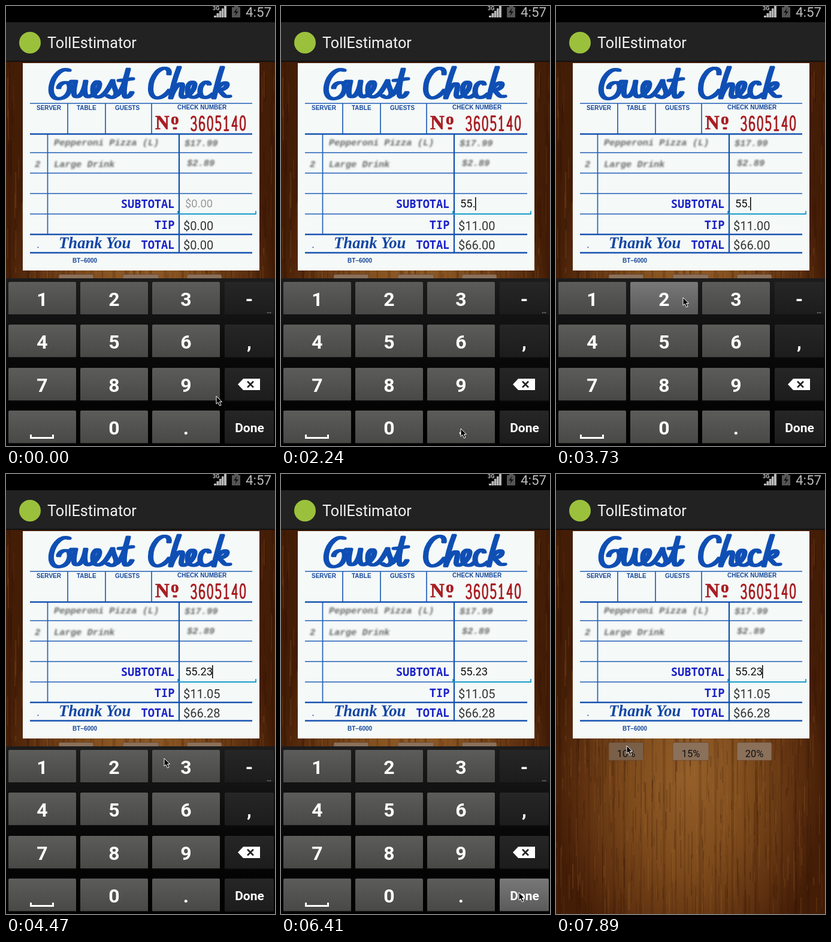
Recreate the animation shown at these times as an HTML page. Size 449 px wide and 732 px high, loop 8000 ms.

```html
<!DOCTYPE html>
<html lang="en">
<head>
<meta charset="utf-8">
<title>Tip screen</title>
<style>
html, body { margin: 0; width: 100%; height: 100%; overflow: hidden; background: #000; }
svg { display: block; font-family: Roboto, sans-serif; }
.label { font: bold 10px "Liberation Sans", Arial, sans-serif; fill: #16489c; }
.row { font: bold 18.7px "Noto Sans Mono", monospace; fill: #1a22c8; text-anchor: end; }
.faded { font: italic bold 15.4px "Liberation Mono", monospace; fill: #666; filter: blur(1.4px); }
.value { font-size: 20px; fill: #333; }
.key { font-size: 32px; font-weight: bold; fill: #fff; text-anchor: middle; }
.percent { font-size: 16.5px; fill: #111; text-anchor: middle; }
.ink { fill: none; stroke-linecap: round; stroke-linejoin: round; }
</style>
</head>
<body>
<svg id="stage" width="449" height="732" viewBox="0 0 449 732">
  <defs>
    <radialGradient id="wood" gradientUnits="userSpaceOnUse" cx="0" cy="0" r="1" gradientTransform="translate(222 500) scale(260 400)">
      <stop offset="0" stop-color="#96602a"/><stop offset=".4" stop-color="#7d4a1b"/>
      <stop offset=".68" stop-color="#5f3110"/><stop offset=".88" stop-color="#441d06"/>
    </radialGradient>
    <linearGradient id="grey" x2="0" y2="1"><stop stop-color="#5c5c5b"/><stop offset="1" stop-color="#484847"/></linearGradient>
    <linearGradient id="dark" x2="0" y2="1"><stop stop-color="#262626"/><stop offset="1" stop-color="#1c1c1c"/></linearGradient>
    <linearGradient id="lit" x2="0" y2="1"><stop stop-color="#787878"/><stop offset="1" stop-color="#5a5a5a"/></linearGradient>
    <linearGradient id="board" x2="0" y2="1"><stop stop-color="#1c1c1c"/><stop offset=".5" stop-color="#080808"/><stop offset="1"/></linearGradient>
  </defs>
  <rect y="93" width="449" height="639" fill="url(#wood)"/>
  <g id="grain"></g>

  <!-- status and title bars -->
  <rect width="449" height="27"/>
  <rect y="27" width="449" height="65" fill="#222"/>
  <rect y="91" width="449" height="2" fill="#111"/>
  <text x="345" y="7" font-size="9" font-weight="bold" fill="#c4c4c4">3G</text>
  <path d="M347 19V16H351V19ZM351.500 19V12H355.500V19ZM356 19V8H359.500V19ZM360 19V4H363.500V19ZM364 19V0H368V19Z" fill="#b8b8b8"/>
  <path d="M377 2H381V0H388V2H391V19H377Z" fill="#555"/>
  <path d="M386 3L380 11H384L382 17L388 9H384Z" fill="#111"/>
  <text x="400" y="18" font-size="22.400" fill="#bbb">4:57</text>
  <circle cx="40" cy="61" r="18" fill="#9bc13c"/>
  <text x="69" y="70" font-size="25.200" fill="#f3f3f3">TollEstimator</text>

  <!-- paper; the lettering is drawn with a broad pen made of shifted strokes -->
  <rect x="28" y="95" width="395" height="345" fill="#f5f9f8"/>
  <g class="ink" stroke="#0f4fb4" stroke-width="4.800">
    <path id="lettering" d="M105 107C94 102 80 114 76 132C73 148 80 156 91 154C103 152 109 140 105 129C98 124 89 130 88 136M105 129L110 125
      M116 125C113 138 111 151 118 151C126 151 131 138 133 125C130 140 131 152 138 151C148 148 156 138 156 130C155 122 145 126 145 140C145 154 156 154 164 146C170 140 176 128 178 124C178 134 188 144 182 150C178 154 172 152 169 149
      M182 150C194 146 200 120 204 105C200 120 195 140 198 150C201 154 207 150 210 144M189 124L211 121
      M272 113C274 102 262 100 252 110C238 126 238 152 252 153C261 153 269 146 273 140
      M289 102C282 120 277 140 275 153C280 138 289 126 294 130C297 136 287 152 297 152C305 150 315 140 315 130C313 123 303 127 303 140C303 154 315 155 323 147
      M339 130C337 122 324 128 324 142C324 156 337 154 346 146
      M361 102C355 120 350 140 347 153M350 140C358 130 367 124 369 130C369 138 358 140 354 140C362 142 362 154 373 150"/>
    <use href="#lettering" x="-2.200"/><use href="#lettering" x="2.200"/>
  </g>
  <path d="M40 162H411M40 244H411M40 278H411M40 312H411M40 346H288M103 162V212M166 162V212M243 162V212M69.500 212V380" stroke="#2360b8" stroke-width="1.700"/>
  <path d="M40 213H411M40 380H411M40 410.500H411M289 212V411" stroke="#1552b0" stroke-width="2.300"/>
  <g class="label">
    <text x="51" y="172.500">SERVER</text><text x="118" y="172.500">TABLE</text><text x="182" y="172.500">GUESTS</text>
    <text x="286" y="172">CHECK NUMBER</text><text x="111" y="426.500">BT–6000</text>
  </g>
  <g fill="#a81e22" stroke="#a81e22" stroke-width=".7" font-family="Liberation Serif, Times, serif" font-weight="bold">
    <text x="249" y="205" font-size="33">N</text><text x="275" y="197" font-size="27">o</text>
    <rect x="279" y="202" width="6" height="3"/>
  </g>
  <g id="number" class="ink" stroke="#a81e22" stroke-width="3.200"></g>
  <g class="faded">
    <text x="80" y="232">Pepperoni Pizza (L)</text><text x="298" y="233">$17.99</text>
    <text x="48" y="268">2</text><text x="80" y="268">Large Drink</text><text x="302" y="266">$2.89</text>
  </g>
  <text class="row" x="281.500" y="336">SUBTOTAL</text>
  <text class="row" x="281.500" y="371">TIP</text>
  <text class="row" x="281.500" y="403.500">TOTAL</text>
  <text x="88" y="403" font-family="Liberation Serif, Times, serif" font-size="26.700" font-weight="bold" font-style="italic" fill="#1246a4">Thank You</text>
  <circle cx="53.500" cy="401.500" r="1" fill="#1246a4"/>
  <path d="M287 341V346H417V341" fill="none" stroke="#1a9bcb" stroke-width="1.800"/>
  <text id="amount" x="299" y="335" font-size="18.400"></text>
  <rect id="caret" y="318" width="1.500" height="22"/>
  <text id="tip" class="value" x="296" y="373"></text>
  <text id="total" class="value" x="296" y="405"></text>

  <g id="percents"></g>
  <g id="keyboard"><rect y="453" width="449" height="279" fill="url(#board)"/></g>
  <path id="pointer" d="M0 0V13L3 10.500L5.500 16L8 15L5.500 9.500H9.500Z" stroke="#fff" stroke-width="1"/>
</svg>
<script>
const $ = id => document.getElementById(id);

function add(parent, tag, attrs, text = '') {
  const el = document.createElementNS('http://www.w3.org/2000/svg', tag);
  for (const name in attrs) el.setAttribute(name, attrs[name]);
  el.textContent = text;
  return parent.appendChild(el);
}

// wood grain
let seed = 7;
const random = () => (seed = seed * 16807 % 2147483647) / 2147483647;
for (let i = 0; i < 1100; i++) {
  add($('grain'), 'rect', {
    x: Math.floor(random() * 449), y: 93 + random() * 620, width: 1 + random() * 1.5,
    height: 8 + random() * 60, fill: random() < .65 ? '#2c1002' : '#a06a30', opacity: .08 + random() * .16
  });
}
for (let x = 4; x < 449; x += 14 + random() * 16) {
  add($('grain'), 'rect', { x, y: 93, width: 2 + random() * 3, height: 639, fill: '#2a0f02', opacity: .16 });
}

// stamped check number
const strokes = {
  0: 'M5 0Q10 0 10 11.5Q10 23 5 23Q0 23 0 11.5Q0 0 5 0',
  1: 'M1 4L5 0V23M1 23H9',
  3: 'M0 3Q1 0 5 0Q9 0 9 5Q9 11 4 11Q10 11 10 17Q10 23 5 23Q1 23 0 20',
  4: 'M8 23V0L0 16H10',
  5: 'M9 0H1V10Q9 7 10 15Q10 23 4 23Q1 23 0 20',
  6: 'M9 3Q8 0 5 0Q0 0 0 12Q0 23 5 23Q10 23 10 16Q10 10 5 10Q0 10 0 16'
};
[...'3605140'].forEach((digit, i) =>
  add($('number'), 'path', { d: strokes[digit], transform: `translate(${309.5 + i * 13.6} ${184 - i * .1}) scale(.8 1)` }));

const percents = [[88, 58], [195, 60], [302, 58]].map(([x, width], i) => {
  const button = add($('percents'), 'rect', { x, y: 446.5, width, height: 30, rx: 2, stroke: '#5a3a20', 'stroke-opacity': .5 });
  add($('percents'), 'text', { class: 'percent', x: x + width / 2, y: 471 }, `${10 + i * 5}%`);
  button.setAttribute('fill', '#8b705a');
  return button;
});

// keyboard
const board = $('keyboard'), keys = {};
['123-', '456,', '789<', ' 0.D'].forEach((row, r) => [...row].forEach((name, c) => {
  const x = [4, 124, 244, 365][c], width = c < 3 ? 113 : 82, y = Math.round(459 + r * 71.4);
  keys[name] = add(board, 'rect', { x, y, width, height: 55, rx: 2, fill: c < 3 ? 'url(#grey)' : 'url(#dark)' });
  add(board, 'rect', { x, y: y + 54, width, height: 1.5, fill: '#111' });
  if (name === 'D') add(board, 'text', { class: 'key', x: 406.5, y: 709, style: 'font-size:21px' }, 'Done');
  else if (name !== ' ' && name !== '<') add(board, 'text', { class: 'key', x: x + width / 2, y: y + 40 }, name);
}));
add(board, 'path', { d: 'M41.500 713V718.500H78.500V713', fill: 'none', stroke: '#fff', 'stroke-width': 3 });
add(board, 'path', { d: 'M387 629.500L396 620H424V639H396Z', fill: '#fff' });
add(board, 'path', { d: 'M403 624.500L413 634.500M413 624.500L403 634.500', stroke: '#222', 'stroke-width': 2.5 });
add(board, 'text', { x: 435, y: 511, 'font-size': 12, fill: '#ccc' }, '…');

const TICK = 149, LOOP = 8000;
const typed = [[-910 / TICK, ''], [6, '5'], [9, '55'], [15, '55.'], [26, '55.2'], [30, '55.23']];
const route = [
  [0, 351, 649], [4, 200, 559], [10, 200, 559], [14, 300, 703], [18, 300, 703],
  [22, 243, 532], [24, 212, 485], [26, 212, 485], [29, 264, 473], [31, 264, 473],
  [34, 368, 670], [36, 368, 670], [38, 397, 696], [44, 397, 696], [52, 118, 452], [60, 118, 452]
];

function pointerAt(tick) {
  const i = route.findIndex(stop => stop[0] > tick);
  const [from, x, y] = route[i - 1], [to, x2, y2] = route[i];
  const p = (tick - from) / (to - from);
  return [x + (x2 - x) * p, y + (y2 - y) * p];
}

function draw(tick) {
  const [since, text] = typed.filter(entry => entry[0] <= tick).pop();
  const value = Number(text);
  $('amount').textContent = text || '$0.00';
  $('amount').setAttribute('fill', text ? '#111' : '#999');
  $('tip').textContent = '$' + (value * .2).toFixed(2);
  $('total').textContent = '$' + (value * 1.2).toFixed(2);
  const textWidth = text ? $('amount').getComputedTextLength() : 0;
  $('caret').setAttribute('x', Math.floor(298.5 + textWidth));
  const blinkOn = Math.floor((tick - since) * TICK / 500) % 2 === 0;
  $('caret').setAttribute('visibility', blinkOn ? 'visible' : 'hidden');
  $('pointer').setAttribute('transform', `translate(${pointerAt(tick).map(Math.round)})`);
  board.setAttribute('visibility', tick < 44 ? 'visible' : 'hidden');
  keys[2].setAttribute('fill', tick === 25 ? 'url(#lit)' : 'url(#grey)');
  keys.D.setAttribute('fill', tick === 42 || tick === 43 ? 'url(#lit)' : 'url(#dark)');
  percents[0].setAttribute('fill', tick >= 53 ? '#7a5f49' : '#8b705a');
}

let shown = -1;
function frame() {
  const tick = Math.min(53, Math.floor((performance.now() % LOOP + 10) / TICK));
  if (tick !== shown) draw(shown = tick);
  requestAnimationFrame(frame);
}
frame();
</script>
</body>
</html>
```
